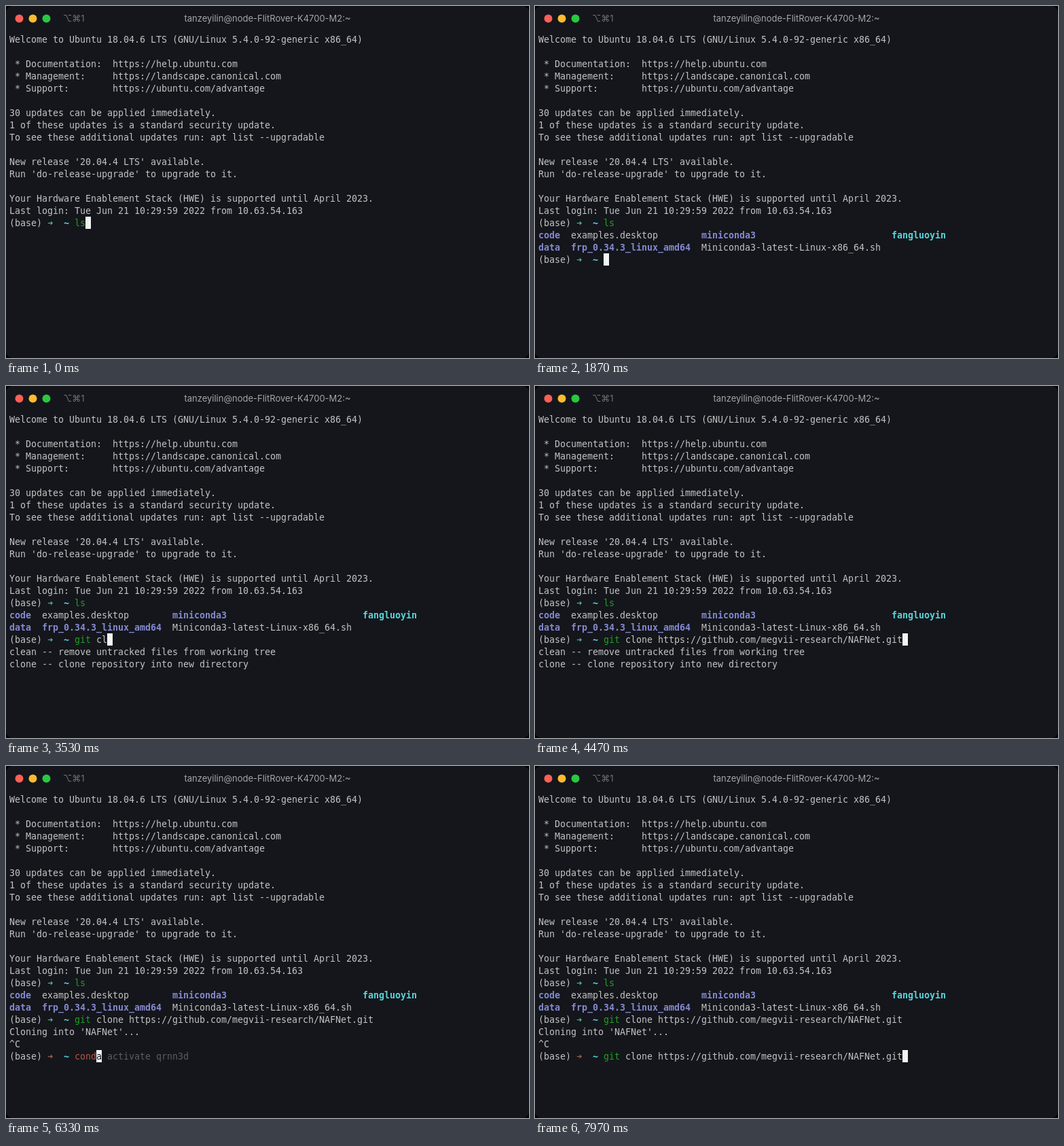
Recreate the animation shown at these times as an HTML page with a canvas. Size 770 px wide and 518 px high, loop 8000 ms.

```html
<!DOCTYPE html>
<html lang="en">
<head>
<meta charset="utf-8">
<title>Terminal session</title>
<style>
  html, body { margin: 0; width: 100%; height: 100%; overflow: hidden; background: #000; }
  canvas { display: block; width: 770px; height: 518px; }
</style>
</head>
<body>
<canvas id="screen"></canvas>
<script>
const WIDTH = 770, HEIGHT = 518, LOOP = 8000;
const CELL = 8, LINE = 18, LEFT = 5, TOP = 40;
const MONO = '"DejaVu Sans Mono", "Liberation Mono", monospace';
const SANS = 'Inter, "DejaVu Sans", sans-serif';
const color = {
  back: '#14161b', text: '#c2c3c4', title: '#a5a6a8', tab: '#707276',
  green: '#1f9f22', red: '#b5524c', ok: '#4fb98c', failed: '#a4625c',
  cyan: '#58d6dc', folder: '#8489d0', ghost: '#5b5d60', cursor: '#f4f4f4'
};

const welcome = [
  'Welcome to Ubuntu 18.04.6 LTS (GNU/Linux 5.4.0-92-generic x86_64)',
  '',
  ' * Documentation:  https://help.ubuntu.com',
  ' * Management:     https://landscape.canonical.com',
  ' * Support:        https://ubuntu.com/advantage',
  '',
  '30 updates can be applied immediately.',
  '1 of these updates is a standard security update.',
  'To see these additional updates run: apt list --upgradable',
  '',
  "New release '20.04.4 LTS' available.",
  "Run 'do-release-upgrade' to upgrade to it.",
  '',
  'Your Hardware Enablement Stack (HWE) is supported until April 2023.',
  'Last login: Tue Jun 21 10:29:59 2022 from 10.63.54.163'
];
const clone = 'git clone https://github.com/megvii-research/NAFNet.git';
const activate = 'conda activate qrnn3d';
const history = ['git push', activate];

// Moments at which the session moves on, in ms
const at = { list: 1800, menu: 3450, enter: 4800, interrupt: 5300, prompt: 5700 };
const cloneKeys = [
  [at.list, ''], [2200, 'g'], [2310, 'gi'], [2420, 'git'], [2560, 'git '],
  [3000, 'git c'], [3200, 'git cl'], [3700, 'git clone '], [4300, clone]
];
const condaKeys = [
  [at.prompt, ''], [5950, 'c'], [6060, 'co'], [6170, 'con'], [6280, 'cond'],
  [6390, 'conda'], [6500, 'conda '], [6620, 'conda a'], [6800, activate], [7700, clone]
];

const canvas = document.getElementById('screen');
const ctx = canvas.getContext('2d');
const scale = window.devicePixelRatio || 1;
canvas.width = WIDTH * scale;
canvas.height = HEIGHT * scale;
ctx.scale(scale, scale);

// Every character sits in its own grid cell
function put(row, col, text, fill = color.text, bold = false) {
  ctx.font = `${bold ? 'bold ' : ''}13.3px ${MONO}`;
  ctx.fillStyle = fill;
  [...text].forEach((char, i) => {
    if (char !== ' ') ctx.fillText(char, LEFT + (col + i) * CELL, TOP + row * LINE + 14);
  });
}

function cursor(row, col, under = '') {
  ctx.fillStyle = color.cursor;
  ctx.fillRect(LEFT + col * CELL, TOP + row * LINE, CELL, LINE);
  put(row, col, under, color.back);
}

function prompt(row, command, arrow = color.ok, editing = false) {
  const start = 12;
  const name = command.split(' ')[0];
  const known = ['ls', 'git', 'conda'].includes(name);
  put(row, 0, '(base)');
  put(row, 7, '➜', arrow);
  put(row, 10, '~', color.cyan, true);
  put(row, start, name, known ? color.green : color.red);
  put(row, start + name.length, command.slice(name.length));
  if (!editing) return;
  const match = command && history.find(entry => entry.startsWith(command));
  const rest = match ? match.slice(command.length) : '';
  const end = start + command.length;
  put(row, end + 1, rest.slice(1), color.ghost);
  cursor(row, end, rest.slice(0, 1));
}

const typed = (keys, t) => keys.filter(([time]) => time <= t).pop()[1];

function windowBar() {
  ctx.fillStyle = color.back;
  ctx.beginPath();
  ctx.roundRect(0, 0, WIDTH, HEIGHT, 9);
  ctx.fill();
  ['#fe5f57', '#febc2e', '#28c840'].forEach((fill, i) => {
    ctx.fillStyle = fill;
    ctx.beginPath();
    ctx.arc(19.5 + i * 20, 18.5, 6, 0, Math.PI * 2);
    ctx.fill();
  });
  ctx.font = `13px ${SANS}`;
  ctx.fillStyle = color.tab;
  ctx.fillText('⌥⌘1', 84, 23);
  ctx.fillStyle = color.title;
  ctx.textAlign = 'center';
  ctx.fillText('tanzeyilin@node-FlitRover-K4700-M2:~', WIDTH / 2, 23);
  ctx.textAlign = 'left';
}

function listing() {
  put(16, 0, 'code', color.folder, true);
  put(16, 6, 'examples.desktop');
  put(16, 30, 'miniconda3', color.folder, true);
  put(16, 65, 'fangluoyin', color.cyan, true);
  put(17, 0, 'data', color.folder, true);
  put(17, 6, 'frp_0.34.3_linux_amd64', color.folder, true);
  put(17, 30, 'Miniconda3-latest-Linux-x86_64.sh');
}

function draw(t) {
  ctx.clearRect(0, 0, WIDTH, HEIGHT);
  windowBar();
  welcome.forEach((line, row) => put(row, 0, line));
  prompt(15, 'ls', color.ok, t < at.list);
  if (t < at.list) return;

  listing();
  prompt(18, typed(cloneKeys, t), color.ok, t < at.enter);
  if (t < at.enter) {
    if (t >= at.menu) {
      put(19, 0, 'clean -- remove untracked files from working tree');
      put(20, 0, 'clone -- clone repository into new directory');
    }
    return;
  }

  put(19, 0, "Cloning into 'NAFNet'...");
  if (t < at.interrupt) return cursor(20, 0);
  put(20, 0, '^C');
  if (t < at.prompt) return cursor(21, 0);
  prompt(21, typed(condaKeys, t), color.failed, true);
}

function frame() {
  draw(performance.now() % LOOP);
  requestAnimationFrame(frame);
}
frame();
</script>
</body>
</html>
```
